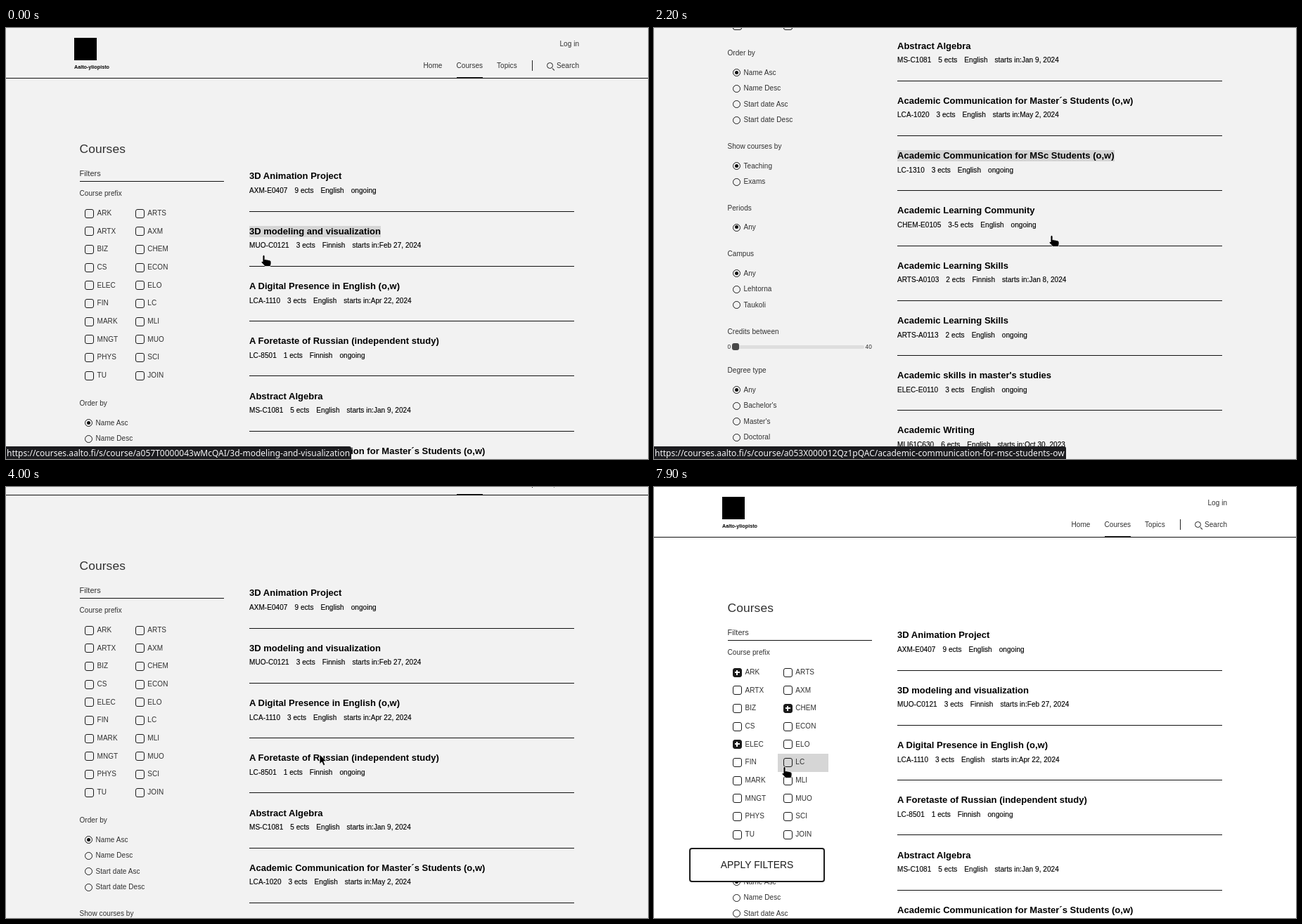
An HTML page that plays this animation: 913x614 px, repeating every 8000 ms.

```html
<!DOCTYPE html>
<html lang="en">
<head>
<meta charset="utf-8">
<title>Courses</title>
<style>
html, body { margin: 0; width: 100%; height: 100%; overflow: hidden; }
#stage { position: relative; width: 913px; height: 614px; overflow: hidden; background: #f2f2f2;
  font: 10px/20px "Liberation Sans", Arial, sans-serif; letter-spacing: .06px; color: #303030; }
#stage.white { background: #fff; }
#stage * { position: absolute; box-sizing: border-box; white-space: pre; }
#page { left: 0; top: 0; width: 913px; height: 1240px; will-change: transform; }
#stage .title { font-size: 13px; font-weight: bold; letter-spacing: .02px; line-height: 16px; color: #000; }
.title.on { background: #d5d5d5; }
#stage .meta { color: #000; -webkit-text-stroke: .15px #000; }
#stage .meta span { position: static; margin-right: 10px; }
.rule { height: 1px; background: #111; }
.h1 { font-size: 17.4px; letter-spacing: .1px; }
.h2 { font-size: 11px; }
.small { font-size: 8.3px; }
.brand { font-size: 7.2px; font-weight: bold; letter-spacing: 0; color: #000; }
.cell { width: 72px; height: 26px; }
.cell.on { background: rgba(0, 0, 0, .16); }
.box { width: 13px; height: 13px; border: 1.5px solid #1a1a1a; border-radius: 3px; }
.box.on { background: #1a1a1a; }
.box.on::before, .box.on::after { content: ""; position: absolute; background: #fff; }
.box.on::before { left: 1.5px; top: 4.25px; width: 7px; height: 1.5px; }
.box.on::after { left: 4.25px; top: 1.5px; width: 1.5px; height: 7px; }
.radio { width: 11px; height: 11px; border: 1.5px solid #1a1a1a; border-radius: 50%; }
.radio.on::after { content: ""; position: absolute; left: 1.5px; top: 1.5px; width: 5px; height: 5px;
  border-radius: 50%; background: #111; }
#apply { left: 50px; top: 514px; width: 193px; height: 49px; border: 2.5px solid #1c1c1c; border-radius: 4px;
  background: #fff; color: #1c1c1c; font-size: 13.9px; line-height: 44px; text-align: center; letter-spacing: 0; }
#status { left: 0; bottom: 0; height: 18.5px; padding: 0 2px 0 1px; border-radius: 0 3px 0 0;
  background: #1c1c1f; color: #f5f5f7; font: 12px/19px "Noto Sans", sans-serif; letter-spacing: 0; }
#cursor { left: 0; top: 0; width: 24px; height: 24px; overflow: visible; }
</style>
</head>
<body>
<div id="stage">
  <div id="page"></div>
  <div id="apply">APPLY FILTERS</div>
  <div id="status"></div>
  <svg id="cursor">
    <path id="hand" fill="#000" stroke="#fff" stroke-width=".8" stroke-linejoin="round"
      d="M-1 1.2Q-1-.5.5-.5T2 1.2V6Q3.4 5 4.6 6.2Q6 5.4 7.1 6.7Q8.4 6 9.3 7.3Q11 7 11 9V11.5Q11 13 9.8 15.5H2.2
         Q.6 13.4-2.4 10.6Q-3.4 9.4-2.3 8.7Q-1.5 8.3-1 9Z"/>
    <path id="arrow" fill="#000" stroke="#fff" stroke-width=".8" stroke-linejoin="round"
      d="M0 0V13.6L3.2 10.7L5.4 15.8L7.8 14.8L5.7 9.8H10Z"/>
  </svg>
</div>
<script>
const LOOP = 8000, TICK = 100, PITCH = 78.28, CELL = 25.67;
const $ = id => document.getElementById(id);
const page = $('page');

function add(cls, x, y, css = {}, text = '') {
  const el = document.createElement('div');
  el.className = cls;
  el.textContent = text;
  Object.assign(el.style, { left: x + 'px', top: y + 'px' }, css);
  page.append(el);
  return el;
}
// y is the middle of the line
const label = (text, x, y, cls = '') => add(cls, x, y - 10, {}, text);
const rule = (x, y, w) => add('rule', x, y, { width: w + 'px' });

// Header
add('', 97, 14, { width: '32px', height: '32px', background: '#000' });
label('Aalto-yliopisto', 97, 56, 'brand');
label('Log in', 787.5, 23);
[['Home', 593.5], ['Courses', 640.5], ['Topics', 698], ['Search', 783]].forEach(([s, x]) => label(s, x, 53.5));
rule(0, 71, 913);
add('', 641, 70, { width: '37px', height: '2px', background: '#111' });
add('', 748, 46, { width: '1px', height: '15px', background: '#222' });
add('', 769, 49, { width: '9px', height: '9px', border: '1.2px solid #222', borderRadius: '50%' });
add('', 776.5, 57, { width: '4px', height: '1.2px', background: '#222', transformOrigin: '0 50%', transform: 'rotate(45deg)' });

// Filters
label('Courses', 104.5, 172, 'h1');
label('Filters', 104.5, 207, 'h2');
rule(105, 218, 205);
label('Course prefix', 104.5, 235.5);
const cells = [], boxes = [];
'ARK ARTS ARTX AXM BIZ CHEM CS ECON ELEC ELO FIN LC MARK MLI MNGT MUO PHYS SCI TU JOIN'.split(' ').forEach((name, i) => {
  const x = 104.5 + (i % 2) * 71.8, y = 264 + (i >> 1) * CELL;
  cells.push(add('cell', x, y - 12.8));
  boxes.push(add('box', Math.round(x + 7.5), Math.round(y - 6.5)));
  label(name, x + 25, y);
});

function radios(head, y, first, names) {
  label(head, 104.5, y);
  names.forEach((name, i) => {
    const cy = first + i * 22.5;
    add(i ? 'radio' : 'radio on', 112, cy - 5.5);
    label(name, 127.5, cy);
  });
}
radios('Order by', 535, 562.5, ['Name Asc', 'Name Desc', 'Start date Asc', 'Start date Desc']);
radios('Show courses by', 668, 695.5, ['Teaching', 'Exams']);
radios('Periods', 755.5, 783, ['Any']);
radios('Campus', 821, 848.5, ['Any', 'Lehtorna', 'Taukoli']);
label('Credits between', 104.5, 931.5);
label('0', 104.5, 953, 'small');
add('', 110, 951, { width: '189px', height: '5px', background: '#dedede', borderRadius: '2px' });
add('', 110.5, 948, { width: '10px', height: '10px', background: '#484848', borderRadius: '3px' });
label('40', 300.5, 953, 'small');
radios('Degree type', 986.5, 1014.5, ['Any', "Bachelor's", "Master's", 'Doctoral']);

// Course list
const titles = [
  '3D Animation Project|AXM-E0407|9|English|ongoing',
  '3D modeling and visualization|MUO-C0121|3|Finnish|Feb 27, 2024',
  'A Digital Presence in English (o,w)|LCA-1110|3|English|Apr 22, 2024',
  'A Foretaste of Russian (independent study)|LC-8501|1|Finnish|ongoing',
  'Abstract Algebra|MS-C1081|5|English|Jan 9, 2024',
  'Academic Communication for Master´s Students (o,w)|LCA-1020|3|English|May 2, 2024',
  'Academic Communication for MSc Students (o,w)|LC-1310|3|English|ongoing',
  'Academic Learning Community|CHEM-E0105|3-5|English|ongoing',
  'Academic Learning Skills|ARTS-A0103|2|Finnish|Jan 8, 2024',
  'Academic Learning Skills|ARTS-A0113|2|English|ongoing',
  "Academic skills in master's studies|ELEC-E0110|3|English|ongoing",
  'Academic Writing|MLI61C630|6|English|Oct 30, 2023'
].map((row, i) => {
  const [name, code, ects, lang, when] = row.split('|'), y = 211 + i * PITCH;
  const meta = label('', 346, y + 21, 'meta');
  [code, ects + ' ects', lang, when === 'ongoing' ? when : 'starts in:' + when].forEach(s => {
    const span = document.createElement('span');
    span.textContent = s;
    meta.append(span);
  });
  rule(346, Math.round(y + 49.6), 462);
  return add('title', 346, y - 7.6, {}, name);
});

const links = [
  'a057T0000043wMcQAI/3d-modeling-and-visualization',
  'a053X000012Qx58QAC/academic-communication-for-masters-students-ow',
  'a053X000012Qz1pQAC/academic-communication-for-msc-students-ow'
];

// time, scroll offset
const scroll = [[0, 0], [300, 0], [1100, 140], [2200, 499], [2500, 510], [3400, 169.5], [3900, 80], [4300, 0]];
// time, pointer x, y
const pointer = [[0, 366, 324], [100, 365, 324], [300, 365, 324], [1100, 543, 323], [2200, 565, 296],
  [2700, 530, 380], [3400, 509, 419], [3900, 500, 400], [4600, 122, 268], [4700, 120, 263], [5100, 121, 265],
  [5400, 160, 291], [5700, 192, 319], [6400, 191, 316], [6600, 200, 338], [6800, 238, 358], [6950, 215, 388],
  [7100, 150, 390], [7250, 122, 370], [7500, 121, 369], [7900, 185, 399]];
// time, lit title, shown link
const hover = [[0, 1, 0], [500, 2, -1], [800, 3, -1], [1300, 4, -1], [1500, 5, 1], [1900, 6, 2],
  [2600, -1, 2], [3000, -1, 1], [4000, -1, -1]];
// checkbox index, time it is ticked
const ticks = [[0, 4900], [5, 6000], [8, 7400]];
const APPLY_AT = 5000;

const last = (keys, t) => keys.filter(k => k[0] <= t).pop();
function at(keys, t, n) {
  const a = last(keys, t), b = keys[keys.indexOf(a) + 1];
  return b ? a[n] + (b[n] - a[n]) * (t - a[0]) / (b[0] - a[0]) : a[n];
}

function draw(t) {
  const top = at(scroll, t, 1), x = at(pointer, t, 1), y = at(pointer, t, 2);
  const [, lit, link] = last(hover, t);
  const col = Math.floor((x - 104.5) / 71.8), row = Math.floor((y + top - 251.2) / CELL);
  const over = col >= 0 && col < 2 && row >= 0 && row < 10 ? row * 2 + col : -1;

  page.style.transform = `translateY(${-top}px)`;
  titles.forEach((el, i) => el.classList.toggle('on', i === lit));
  cells.forEach((el, i) => el.classList.toggle('on', i === over));
  ticks.forEach(([i, from]) => boxes[i].classList.toggle('on', t >= from));
  $('stage').classList.toggle('white', t >= APPLY_AT);
  $('apply').style.display = t >= APPLY_AT ? '' : 'none';
  $('status').style.display = link < 0 ? 'none' : '';
  $('status').textContent = link < 0 ? '' : 'https://courses.aalto.fi/s/course/' + links[link];
  const hand = lit >= 0 || over >= 0;
  $('hand').style.display = hand ? '' : 'none';
  $('arrow').style.display = hand ? 'none' : '';
  $('cursor').style.transform = `translate(${Math.round(x)}px, ${Math.round(y)}px)`;
}

let start;
function frame(now) {
  start ??= now;
  draw(Math.floor((now - start) % LOOP / TICK) * TICK);
  requestAnimationFrame(frame);
}
draw(0);
requestAnimationFrame(frame);
</script>
</body>
</html>
```
